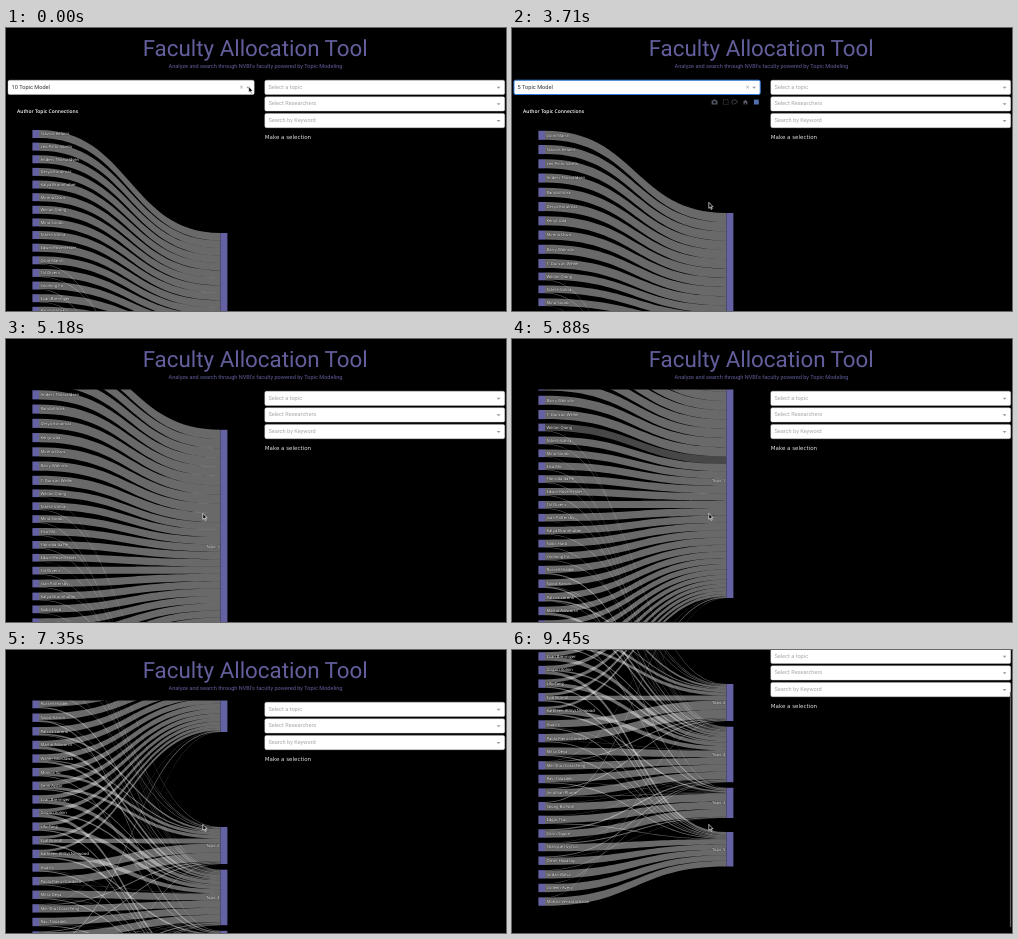
Recreate the animation shown at these times as an HTML page. Size 500x283 px, loop 9.52 s.

```html
<!DOCTYPE html>
<html lang="en">
<head>
<meta charset="utf-8">
<title>Faculty Allocation Tool</title>
<style>
  html, body { margin: 0; width: 100%; height: 100%; overflow: hidden; background: #000; }
  svg { display: block; width: 500px; height: 283px; text-rendering: geometricPrecision; }
  .ui { font: 5.62px Roboto, sans-serif; }
  .label { font: 4.15px "Open Sans", sans-serif; fill: #fff; stroke: #000; stroke-opacity: .4; stroke-width: .6px; paint-order: stroke; }
</style>
</head>
<body>
<svg id="stage" viewBox="0 0 500 283">
  <defs>
    <clipPath id="clip"><rect x="0" y="50.5" width="254" height="286"/></clipPath>
  </defs>
  <rect width="500" height="283" fill="#000"/>
  <g id="page">
    <g fill="#625f9c" text-anchor="middle" font-family="Roboto, sans-serif">
      <text x="249.2" y="27.5" font-size="22.35">Faculty Allocation Tool</text>
      <text x="249.5" y="40.4" font-size="5.59">Analyze and search through NVBI's faculty powered by Topic Modeling</text>
    </g>
    <g id="form"></g>
    <text x="258.8" y="110.7" fill="#dcdcdc" font-family="'DejaVu Sans', sans-serif" font-size="5.53">Make a selection</text>
    <g clip-path="url(#clip)">
      <g id="panel">
        <text x="11" y="85" fill="#fff" font-family="'Open Sans', sans-serif" font-size="4.95" font-weight="600">Author Topic Connections</text>
        <g id="links" fill="#fff"></g>
        <g id="nodes" fill="#6562a3"></g>
        <g id="labels"></g>
        <g id="tools" fill="#555a66" stroke="none">
          <path d="M199.6 72.4h1.3l.6-.9h2l.6.9h1.3v4h-5.8z"/>
          <circle cx="202.5" cy="74.3" r="1.2" fill="#000"/>
          <rect x="211.4" y="71.6" width="4.8" height="4.8" fill="none" stroke="#555a66" stroke-width=".7" stroke-dasharray="1 .8"/>
          <path d="M220.6 76.6c.9-1-.8-1.1-.8-2.5 0-1.5 1.2-2.3 2.7-2.3s2.6.8 2.6 2-1.3 2.1-3 2.1" fill="none" stroke="#555a66" stroke-width=".8"/>
          <path d="M230.7 74.2l2.7-2.5 2.7 2.5h-.8v2.2h-1.3v-1.5h-1.2v1.5h-1.3v-2.2z"/>
          <rect x="241.9" y="71.6" width="4.9" height="4.9" fill="#526fb0"/>
        </g>
        <g id="picker"></g>
      </g>
    </g>
  </g>
  <rect id="bar" x="497.9" width="1.3" height="235" rx=".6" fill="#5c5c5c"/>
  <path id="mouse" d="M0 0V6.1L1.4 4.8L2.4 7.1L3.4 6.7L2.4 4.5H4.3Z" fill="#000" stroke="#fff" stroke-width=".65"/>
</svg>
<script>
const LOOP = 9520, STEP = 70;
const $ = id => document.getElementById(id);

function add(parent, tag, attrs, text) {
  const el = document.createElementNS('http://www.w3.org/2000/svg', tag);
  for (const k in attrs) el.setAttribute(k, attrs[k]);
  if (text) el.textContent = text;
  parent.appendChild(el);
  return el;
}
const show = (el, on) => el.setAttribute('display', on ? 'inline' : 'none');
const move = (el, x, y) => el.setAttribute('transform', `translate(${x} ${y})`);
const mix = (a, b, k) => a + (b - a) * k;

// Linear track through [time, value] points
function track(keys, t) {
  if (t <= keys[0][0]) return keys[0][1];
  for (let i = 1; i < keys.length; i++) {
    const [t0, a] = keys[i - 1], [t1, b] = keys[i];
    if (t <= t1) return mix(a, b, (t - t0) / (t1 - t0));
  }
  return keys[keys.length - 1][1];
}

let seed = 11;
function rnd() {
  seed = (seed * 16807) % 2147483647;
  return seed / 2147483647;
}

const people = `Colin Marsh,Stavros Kelanis,Leo Pinto-Varela,Anders Thorvaldsen,Randall Vosk,Derya Korulmaz,
Kenjo Uda,Mirena Dovic,Barry Wolnicki,T. Duncan Weller,Weilan Qiong,Nitesh Vohra,Mina Sorabi,Elsa Mo,Florinda da Pe,
Edwin Rosenfelder,Tal Orveni,Joan Pattersby,Katya Brunnhuber,Nabil Harb,Yanming Fo,Russell Hladek,Navid Karoni,
Patrick Lorenti,Martin Aldworth,Walter Morizawa,Monica Su,Cenk Aydar,Evan Brenniger,Grigori Volnin,Lifu Tang,
Eyal Brandl,Kathleen (Kitty) Norwood,Huan Ji,Paola Rienzi-Cardoso,Mitra Deya,Mei-Shu (Cora) Feng,Ravi Talukdeb,
Jonathan Plume,Seung-Bo Noh,Edgar Tsai,Corin Squire,Shanyue (Ivy) Lo,Omer Havasoy,Jordan Balsa,Colleen Avery,
Mohan Venkatachalan`.split(',').map(s => s.trim());
const N = people.length;
const tenOrder = [1, 2, 3, 5, 18, 7, 10, 12, 11, 15, 0, 16, 20, 28, 4];
const topicNames = [1, 2, 4, 3, 5].map(n => 'Topic ' + n);
const sideTopics = [0, 1, 1, 2, 2, 2, 3, 4];

// Share of each author's work per topic: one main topic, one or two side topics
function shares(i) {
  const w = [0, 0, 0, 0, 0];
  const main = i < 33 ? 0 : i < 35 ? 1 : i < 39 ? 2 : i < 42 ? 3 : 4;
  const keep = i < 10 ? 1 : i < 21 ? .94 : i < 33 ? mix(.85, .3, (i - 21) / 11) : i < 44 ? .86 : .96;
  w[main] = keep;
  const parts = i < 10 ? [] : i < 21 || i > 43 ? [1] : [.72, .28];
  for (const p of parts) {
    let k;
    do k = sideTopics[Math.floor(rnd() * sideTopics.length)]; while (k === main);
    w[k] += (1 - keep) * p;
  }
  return w;
}
const flow = people.map((_, i) => shares(i));

function layout(center, height, topics) {
  const nodes = people.map((_, i) => ({ y: center(i) - height(i) / 2, h: height(i) }));
  const scale = topics.map((tp, k) => tp[1] / nodes.reduce((s, n, i) => s + n.h * flow[i][k], 0));
  const right = topics.map(tp => tp[0]);
  const links = [];
  nodes.forEach((n, i) => {
    let y = n.y;
    flow[i].forEach((f, k) => {
      if (!f) return;
      const a = n.h * f, b = a * scale[k];
      links.push([y, a, right[k], b]);
      y += a;
      right[k] += b;
    });
  });
  return { nodes: nodes.concat(topics.map(([y, h]) => ({ y, h }))), links };
}
const ten = layout(i => 106 + 12.63 * i, () => 8,
  [[205, 205], [440, 33], [500, 50], [570, 28], [620, 32]]);
const five = layout(
  i => 107.3 + 14.25 * Math.min(i, 9) + 12.9 * Math.max(0, Math.min(i, 20) - 9) + 13.62 * Math.max(0, i - 20),
  i => i < 10 ? 9.1 : i < 21 ? 7.7 : 8.4,
  [[185, 234], [514, 37], [556.7, 55.5], [617.8, 30.2], [662, 34.5]]);

const linkEls = ten.links.map(() => add($('links'), 'path', { 'fill-opacity': .41 }));
const nodeEls = ten.nodes.map((_, i) => add($('nodes'), 'rect', { x: i < N ? 26.4 : 214.4, width: i < N ? 6.6 : 7 }));
const labelEls = ten.nodes.map((_, i) => add($('labels'), 'text', {
  class: 'label', x: i < N ? 34.5 : 213.4, 'text-anchor': i < N ? 'start' : 'end'
}));
// The first ten authors have one link each, so this is the eleventh author's main link
const hoverLink = linkEls[10];

let drawn = -1;
function drawChart(k) {
  if (k === drawn) return;
  drawn = k;
  linkEls.forEach((el, i) => {
    const [y, a, z, b] = ten.links[i].map((v, n) => mix(v, five.links[i][n], k));
    el.setAttribute('d', `M33 ${y}C123.7 ${y} 123.7 ${z} 214.4 ${z}V${z + b}C123.7 ${z + b} 123.7 ${y + a} 33 ${y + a}Z`);
  });
  nodeEls.forEach((el, i) => {
    const y = mix(ten.nodes[i].y, five.nodes[i].y, k), h = mix(ten.nodes[i].h, five.nodes[i].h, k);
    el.setAttribute('y', y);
    el.setAttribute('height', h);
    labelEls[i].setAttribute('y', y + h / 2 + 1.4);
    labelEls[i].textContent = i >= N ? topicNames[i - N]
      : people[k === 0 && i < tenOrder.length ? tenOrder[i] : i];
  });
}

function field(parent, x, y, w, text, color) {
  const box = add(parent, 'rect', { x, y, width: w, height: 14.3, rx: 1.6, fill: '#fff', stroke: '#ccc', 'stroke-width': .4 });
  const label = add(parent, 'text', { class: 'ui', x: x + 3.6, y: y + 8.3, fill: color }, text);
  add(parent, 'path', { d: `M${x + w - 8} ${y + 6.5}h3.8l-1.9 2z`, fill: '#999' });
  return { box, label };
}
['Select a topic', 'Select Researchers', 'Search by Keyword'].forEach((s, i) =>
  field($('form'), 258.8, 52.2 + 16.6 * i, 239.9, s, '#a8a8a8'));

const model = field($('picker'), 2, 52.2, 246.2, '10 Topic Model', '#333');
add($('picker'), 'path', { d: 'M234.2 57.8l2.6 2.6m0-2.6l-2.6 2.6', stroke: '#888', 'stroke-width': .6 });
const menu = add($('picker'), 'g', {});
add(menu, 'rect', { x: 2, y: 66.7, width: 246.2, height: 60.9, fill: '#fff', stroke: '#ccc', 'stroke-width': .4 });
const rows = [5, 10, 15, 20, 25].map((n, i) => {
  const y = 66.9 + 12.1 * i;
  const row = add(menu, 'rect', { x: 2.2, y, width: 245.8, height: 12.1 });
  add(menu, 'text', { class: 'ui', x: 5.6, y: y + 8, fill: '#555' }, n + ' Topic Model');
  return row;
});

const panelTrack = [[3780, 0], [4200, 11], [4550, 35], [5880, 160], [7350, 337], [7980, 397], [8190, 427]];
const pageTrack = [[8470, 0], [8820, 26], [9240, 49.5], [9310, 49.5], [9450, 53]];
const mouseX = [[1050, 242.7], [1120, 245.5], [1610, 245.5], [2100, 226], [2170, 226], [3150, 197.2], [3640, 197.2], [3710, 196.8]];
const mouseY = [[1050, 58.5], [1120, 58], [1610, 58], [2100, 72], [2170, 72], [3150, 172.7], [3220, 174], [3640, 174], [3710, 174.3]];

function render(t) {
  const open = t >= 1260 && t < 2240, picked = t >= 2240;
  const my = track(mouseY, t), scroll = track(pageTrack, t);
  move($('page'), 0, -scroll);
  move($('panel'), 0, -track(panelTrack, t));
  move($('mouse'), track(mouseX, t), my);

  model.label.textContent = (picked ? 5 : 10) + ' Topic Model';
  model.box.setAttribute('stroke', t >= 1260 ? '#2f7fe0' : '#ccc');
  model.box.setAttribute('stroke-width', t >= 1260 ? 1 : .4);
  show(menu, open);
  const active = my > 67 ? 0 : 1;
  rows.forEach((r, i) => r.setAttribute('fill', i === active ? '#ebf5ff' : i === 1 ? '#f5faff' : '#fff'));

  show($('tools'), picked && my > 80);
  drawChart(track([[2380, 0], [2870, 1]], t));
  hoverLink.setAttribute('fill-opacity', t >= 5320 && t < 6300 ? .28 : .41);

  show($('bar'), t >= 8540);
  $('bar').setAttribute('y', 2 + scroll * 40 / 53);
}

const start = performance.now();
function tick() {
  const t = (performance.now() - start) % LOOP;
  render(Math.floor(t / STEP) * STEP);
  requestAnimationFrame(tick);
}
tick();
</script>
</body>
</html>
```
